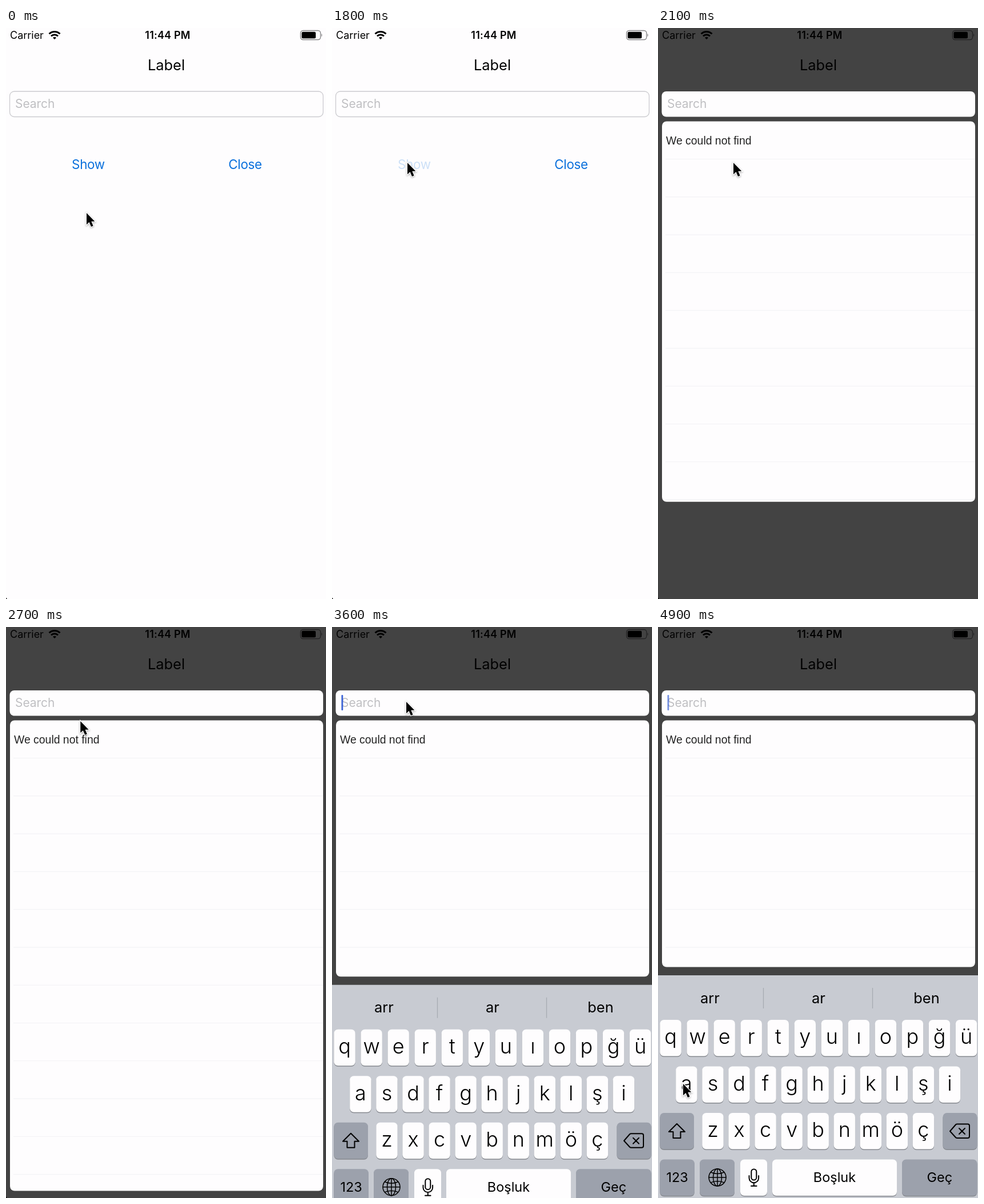
Recreate the animation shown at these times as an HTML page. Size 560x1000 px, loop 5000 ms.

```html
<!DOCTYPE html>
<html lang="en">
<head>
<meta charset="utf-8">
<title>Search dropdown</title>
<style>
  html, body { margin: 0; width: 100%; height: 100%; overflow: hidden; background: #fefdfe; }
  svg { display: block; width: 100%; height: 100%; font-family: Inter, Roboto, sans-serif; }
  .mid { text-anchor: middle; }
  .link { font-size: 22.4px; letter-spacing: -.3px; fill: #0a70dc; }
  .line { fill: none; stroke: #000; stroke-width: 2; stroke-linejoin: round; stroke-linecap: round; }
  .letter { font-size: 36px; font-weight: 350; }
  .word { font-size: 23.5px; }
  .hint { font-size: 25.4px; }
  #cursor { filter: drop-shadow(0 1.5px 1.5px rgba(0, 0, 0, .35)); }
</style>
</head>
<body>
<svg viewBox="0 0 560 1000">
  <clipPath id="clip"><rect id="listClip" x="7" y="163.5" width="548" rx="8" ry="8"/></clipPath>

  <text x="7" y="19" font-size="18">Carrier</text>
  <g fill="none" stroke="#000" stroke-width="3">
    <path d="M75.5 10.3a13.6 13.6 0 0 1 19 0M79 14.2a8.6 8.6 0 0 1 12 0"/>
    <path d="M82 17q3-2.6 6 0L85 20z" fill="#000" stroke="none"/>
  </g>
  <text class="mid" x="283" y="19" font-size="18" font-weight="600" letter-spacing=".2">11:44 PM</text>
  <rect x="515.5" y="4.5" width="35" height="16" rx="4.5" fill="none" stroke="#858587" stroke-width="1.4"/>
  <rect x="517.5" y="6.7" width="24.5" height="11.6" rx="2"/>
  <path d="M552 9.8q2.4 2.7 0 5.6z" fill="#858587"/>
  <text class="mid hint" x="280.5" y="74">Label</text>
  <text class="mid link" id="show" x="144" y="247">Show</text>
  <text class="mid link" x="418.5" y="247">Close</text>
  <rect id="dim" width="560" height="1000" opacity=".733"/>

  <rect id="field" x="6.5" y="111" width="548.5" height="44.5" rx="8" fill="#fefdfe" stroke-width="1.3"/>
  <text x="16" y="140.3" font-size="20.9" fill="#bfbfc2">Search</text>
  <rect id="caret" x="16.5" y="119" width="2.8" height="27" rx="1" fill="#3a62d6"/>

  <g id="list" clip-path="url(#clip)">
    <rect x="7" y="163" width="548" height="830" fill="#fefdfe"/>
    <text x="14" y="203.5" font-size="19.4" fill="#222" font-family="Liberation Sans, Arial, sans-serif">We could not find</text>
  </g>
  <path d="M0 997.5v2.5h2z"/>

  <g id="board">
    <rect y="610" width="560" height="390" fill="#c8cbd2"/>
    <path d="M184.5 632v36M375.5 632v36" stroke="#a7abb3" stroke-width="1.3"/>
    <text class="mid hint" x="91" y="658.5">arr</text>
    <text class="mid hint" x="281" y="658.5">ar</text>
    <text class="mid hint" x="470" y="658.5">ben</text>
    <g id="keys"></g>
    <g class="line">
      <path d="M33 870L47 884H39.5V895H26.5V884H19z"/>
      <path d="M511 883L521 871.5Q522 870.5 523.5 870.5H542Q545 870.5 545 873.5V892Q545 895 542 895H523.5Q522 895 521 894zM527 878l10 10m0-10l-10 10"/>
      <g stroke-width="1.5">
        <circle cx="104" cy="964" r="15"/>
        <ellipse cx="104" cy="964" rx="7.5" ry="15"/>
        <path d="M104 949v30M89 964h30M92.5 955q11.5 5 23 0M92.5 973q11.5-5 23 0"/>
      </g>
      <rect x="163.3" y="949.5" width="9" height="19" rx="4.5"/>
      <path d="M159.5 961v4a8.3 8.3 0 0 0 16.6 0v-4M167.8 973.5v5M163 979h9.6"/>
    </g>
  </g>

  <path id="cursor" d="M0 0V20.3L4.6 16.1L8 24L11.6 22.4L8.3 14.8H14.4z" stroke="#fff" stroke-width="2.4" paint-order="stroke"/>
</svg>
<script>
const $ = id => document.getElementById(id);
const clamp = v => Math.max(0, Math.min(1, v));

function add(parent, tag, attrs, text = '') {
  const node = document.createElementNS('http://www.w3.org/2000/svg', tag);
  for (const name in attrs) node.setAttribute(name, attrs[name]);
  node.textContent = text;
  $(parent).append(node);
}

function key(x, row, width, label = '', gray = false, cls = 'letter') {
  const y = 688 + row * 81.5, box = { x, width, height: 63.5, rx: 7 };
  add('keys', 'rect', { ...box, y: y + 1.6, fill: '#86898f' });
  add('keys', 'rect', { ...box, y, fill: gray ? '#9ca1ac' : '#fefdfe' });
  add('keys', 'text', { x: x + width / 2, y: y + (row < 3 ? 42.3 : 39.5), class: 'mid ' + cls }, label);
}

[['qwertyuıopğü', 3.4, 47.04], ['asdfghjklşi', 31.2, 46.05], ['zxcvbnmöç', 77.3, 46.05]]
  .forEach(([letters, x, step], row) =>
    [...letters].forEach((c, i) => key(x + i * step, row, 37.4, c)));
key(3.4, 2, 59.6, '', true);
key(498.5, 2, 60, '', true);
key(3.4, 3, 60.4, '123', true, 'word');
key(73, 3, 61, '', true);
key(144, 3, 47);
key(200, 3, 218, 'Boşluk', false, 'word');
key(427, 3, 131.5, 'Geç', true, 'word');

for (let i = 0; i < 12; i++)
  add('list', 'rect', { x: 13, y: 229 + i * 66.27, width: 542, height: 1.2, fill: '#f3f3f6' });

// Pointer moves: start, end, x, y
const start = [141, 324];
const moves = [
  [500, 1100, 133, 226], [1100, 1500, 132, 236], [2450, 3000, 129.5, 135],
  [3000, 3100, 130, 131], [3600, 4100, 126.5, 306], [4200, 4900, 44, 800]
];

function pointer(t) {
  let [x, y] = start;
  for (const [from, to, nx, ny] of moves) {
    const e = 1 - (1 - clamp((t - from) / (to - from))) ** 2;
    x += (nx - x) * e;
    y += (ny - y) * e;
  }
  return `translate(${x} ${y})`;
}

function draw(t) {
  const open = t >= 1900;
  const p = clamp((t - 1884) / 300), grow = p * p * (3 - 2 * p);
  const rise = 1 - (1 - clamp((t - 3340) / 400)) ** 3;
  const blink = clamp(.7 + .9 * Math.cos((t - 4650) / 500 * Math.PI));

  $('show').setAttribute('opacity', t >= 1800 ? .2 : 1);
  $('dim').setAttribute('visibility', open ? 'visible' : 'hidden');
  $('field').setAttribute('stroke', open ? 'none' : '#cbcbcf');
  $('caret').setAttribute('opacity', t < 3300 ? 0 : t < 3900 ? 1 : blink);
  $('listClip').setAttribute('height', 824 * grow - 392 * rise);
  $('board').setAttribute('transform', `translate(0 ${390 * (1 - rise)})`);
  $('cursor').setAttribute('transform', pointer(t));
}

const began = performance.now();
function tick() {
  const t = (performance.now() - began) % 5000;
  draw(Math.floor(t / 100) * 100); // ten pictures a second
  requestAnimationFrame(tick);
}
tick();
</script>
</body>
</html>
```
